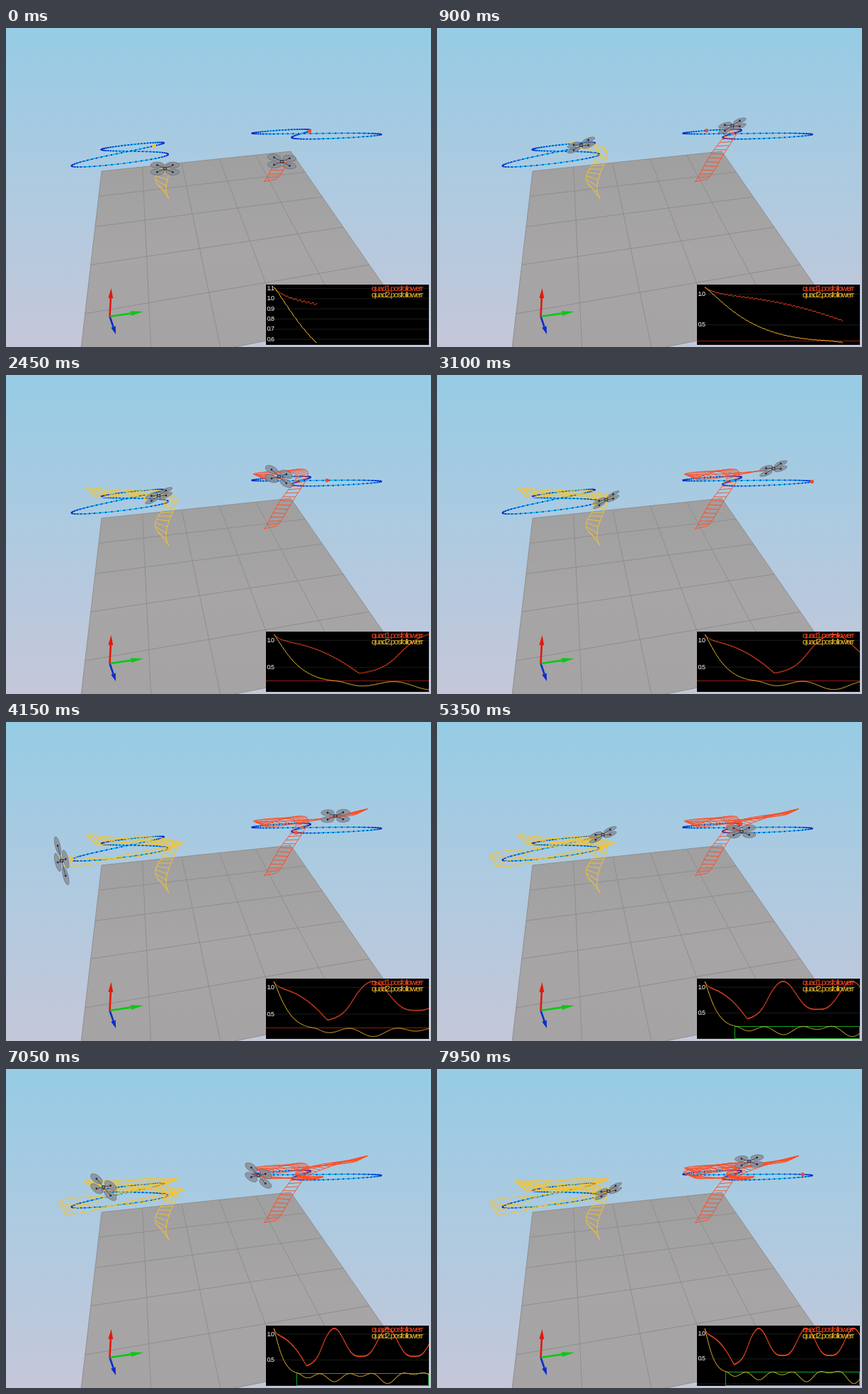
Animation of 600 by 450 pixels, one loop 8 s. Source, as an HTML page with a canvas:

```html
<!DOCTYPE html>
<html lang="en">
<head>
<meta charset="utf-8">
<title>Quadcopter path following</title>
<style>
  html, body { margin: 0; width: 100%; height: 100%; overflow: hidden; background: #b0cadf; }
  canvas { display: block; width: 600px; height: 450px; }
</style>
</head>
<body>
<canvas id="stage" width="600" height="450"></canvas>
<script>
const ctx = document.getElementById('stage').getContext('2d');
const { sin, cos, exp, min, max, abs, PI } = Math;
const LOOP = 8000, STEP = 50, LEAD = 410, LAP = 5120, TURN = 2 * PI;
const RED = '#ff4a22', YELLOW = '#f8c32c';

// Maps the unit square onto a quadrilateral, corners in order (0,0) (1,0) (1,1) (0,1).
function projector([x0, y0], [x1, y1], [x2, y2], [x3, y3]) {
  const ax = x1 - x2, bx = x3 - x2, sx = x0 - x1 + x2 - x3;
  const ay = y1 - y2, by = y3 - y2, sy = y0 - y1 + y2 - y3;
  const det = ax * by - bx * ay;
  const g = (sx * by - bx * sy) / det, h = (ax * sy - sx * ay) / det;
  return (u, v) => {
    const w = g * u + h * v + 1;
    return [((x1 - x0 + g * x1) * u + (x3 - x0 + h * x3) * v + x0) / w,
            ((y1 - y0 + g * y1) * u + (y3 - y0 + h * y3) * v + y0) / w];
  };
}

function smoothstep(a, b, x) {
  const s = min(1, max(0, (x - a) / (b - a)));
  return s * s * (3 - 2 * s);
}

function trace(points) {
  ctx.beginPath();
  points.forEach(([x, y]) => ctx.lineTo(x, y));
}
function line(points, color, width = 1) {
  trace(points);
  ctx.strokeStyle = color;
  ctx.lineWidth = width;
  ctx.stroke();
}
function fillShape(points, color) {
  trace(points);
  ctx.fillStyle = color;
  ctx.fill();
}
function dot(x, y, size, color) {
  ctx.fillStyle = color;
  ctx.fillRect(x - size / 2, y - size / 2, size, size);
}
function vertical(y0, y1, ...colors) {
  const g = ctx.createLinearGradient(0, y0, 0, y1);
  colors.forEach((c, i) => g.addColorStop(i / (colors.length - 1), c));
  return g;
}

// Figure eight in perspective, given its four turning points.
function eight(...corners) {
  const map = projector(...corners);
  return a => map((1 + sin(2 * a)) / 2, (1 - cos(a) / Math.SQRT1_2) / 2);
}
const phase = t => 1.2 - TURN * t / LAP;

// The lagging quad cuts the figure eight down to a slanted loop.
function slantedLoop(t) {
  const a = TURN * (t - 3500) / LAP;
  return [430 + 37 * cos(a) + 28 * sin(a) + 38 * cos(2 * a) - 9 * sin(2 * a),
          142.5 - 16 * cos(a) + 2 * sin(a) - 5 * cos(2 * a)];
}

// Share of the way from the start position to the settled flight.
const arrive = (e, time, swing = Infinity) => 1 - exp(-e / time) * cos(TURN * e / swing);

const wideEight = eight([116, 163], [235, 158], [243, 173], [79, 195]);
const quads = [
  {
    color: YELLOW,
    route: eight([135, 171], [223, 162], [229, 178], [94, 193]),
    start: [225, 234],
    settled: t => wideEight(phase(t)),
    progress: e => [arrive(e, 600), arrive(e, 600)]
  },
  {
    color: RED,
    route: eight([349, 149], [425, 143], [523, 149], [408, 156]),
    start: [373, 215],
    settled: slantedLoop,
    progress: e => [arrive(e, 1000), arrive(e, 1400, 3600)]
  }
];

function place(quad, t) {
  const goal = quad.settled(t), share = quad.progress(t + LEAD);
  return quad.start.map((s, i) => s + (goal[i] - s) * share[i]);
}

// Position and the two diagonal arms; the frame banks with sideways acceleration.
function pose(quad, t) {
  const h = 60, [x, y] = place(quad, t);
  const pull = (place(quad, t + h)[0] - 2 * x + place(quad, t - h)[0]) / (h * TURN / LAP) ** 2;
  const bank = 0.0025 * pull, arm = 11 / Math.hypot(1, bank);
  const depth = max(1.5, 5 + 4 * bank);
  return { x, y, p: [arm, arm * bank + depth], q: [arm, arm * bank - depth] };
}

function drawWorld() {
  ctx.fillStyle = vertical(0, 450, '#96cce5', '#aecae0', '#c5c7d9');
  ctx.fillRect(0, 0, 600, 450);
  const floor = projector([135, 202], [402, 174], [560, 402], [101, 495]);
  fillShape([floor(0, 0), floor(1, 0), floor(1, 1), floor(0, 1)],
    vertical(174, 450, '#a09fa0', '#a7a5a6', '#a5a3a4'));
  for (let i = 0; i <= 5; i++) {
    line([floor(i / 5, 0), floor(i / 5, 1)], '#8f8e8f');
    line([floor(0, i / 5), floor(1, i / 5)], '#8f8e8f');
  }
}

function drawArrow(x, y, head, color) {
  const ox = 146.5, oy = 407, n = Math.hypot(x - ox, y - oy);
  const ux = (x - ox) / n, uy = (y - oy) / n, bx = x - ux * head, by = y - uy * head;
  line([[ox, oy], [bx, by]], color, 2.6);
  fillShape([[x, y], [bx - uy * 3.4, by + ux * 3.4], [bx + uy * 3.4, by - ux * 3.4]], color);
}

function drawRoute(path) {
  const count = 110;
  for (let i = 0; i < count; i++) {
    const a = i / count * TURN, speed = Math.sqrt(abs(cos(2 * a)));
    const [x, y] = path(a);
    line([[x, y], path(a + TURN / count)], `rgb(0,${40 + 150 * speed},${215 + 25 * speed})`, 1.4);
    dot(x, y, 1.8, '#0828c8');
  }
}

function drawTrail(quad, now) {
  const left = [], right = [];
  for (let t = -LEAD; t <= now; t += 20) {
    const { x, y, p, q } = pose(quad, t);
    const wx = 0.4 * (p[0] + q[0]), wy = 0.4 * (p[1] + q[1]);
    left.push([x - wx, y - wy]);
    right.push([x + wx, y + wy]);
  }
  line(left, quad.color);
  line(right, quad.color);
  for (let i = 0; i < left.length; i += 4) line([left[i], right[i]], quad.color, 0.9);
}

function drawQuad(quad, t) {
  const { x, y, p, q } = pose(quad, t);
  const hubs = [1, -1].flatMap(s => [p, q].map(([dx, dy]) => [x + s * dx, y + s * dy]));
  hubs.forEach(hub => {
    ctx.save();
    ctx.transform(...p, ...q, ...hub);
    ctx.beginPath();
    ctx.arc(0, 0, 0.6, 0, TURN);
    ctx.restore();
    ctx.fillStyle = 'rgba(136,142,153,0.85)';
    ctx.fill();
    ctx.strokeStyle = 'rgba(80,85,96,0.8)';
    ctx.lineWidth = 0.6;
    ctx.stroke();
  });
  hubs.forEach(hub => {
    line([[x, y], hub], '#4a4d58');
    dot(...hub, 2.4, '#22242e');
  });
  dot(x, y, 5, '#3a3d4c');
  dot(x, y, 2, '#9aa0c0');
}

const cycle = e => 2 * TURN * (e - 2910) / LAP;
const ripple = e => sin(TURN * e / 40);

function redError(e) {
  const first = max(0.38, 0.98 - 0.24 * (e / 1000) ** 2 + 0.13 * exp(-e / 120));
  const steady = 0.57 + 0.54 * ((1 + cos(cycle(e))) / 2) ** 1.6;
  return first + (steady - first) * smoothstep(1450, 2500, e)
    + 0.011 * smoothstep(0, 250, e) * ripple(e);
}
function yellowError(e) {
  const c = cycle(e);
  const wave = -0.024 - 0.054 * cos(2 * c) - e / 70000 * cos(c);
  return 0.2 + 0.91 * exp(-((e / 440) ** 1.2)) + wave * smoothstep(900, 1500, e) + 0.004 * ripple(e);
}

function drawChart(now) {
  const end = now + LEAD, span = max(end, 1472), top = 1.11, limit = 0.25;
  const samples = [];
  for (let e = 0; e <= end; e += 10) samples.push([e, redError(e), yellowError(e)]);
  const low = min(...samples.map(s => s[2])), range = top - low;
  const px = e => 378 + 219 * e / span, py = v => 444 - 78 * (v - low) / range;

  ctx.save();
  ctx.beginPath();
  ctx.rect(367, 362, 230, 85);
  ctx.clip();
  ctx.fillStyle = '#000';
  ctx.fillRect(367, 362, 230, 85);

  const tick = range < 0.6 ? 0.1 : range < 0.8 ? 0.2 : 0.5;
  ctx.font = '9px "Liberation Sans", Arial, sans-serif';
  ctx.textBaseline = 'middle';
  ctx.letterSpacing = '-1px';
  for (let v = 0; v < 1.15; v += tick) {
    const y = py(v);
    line([[367, y], [597, y]], '#1c1c1c');
    if (v > 0.05 && y < 440) {
      ctx.fillStyle = '#fff';
      ctx.fillText(v.toFixed(1), 368.5, y);
    }
  }

  const limitY = Math.round(py(limit)) + 0.5;
  if (now < 4700) {
    line([[367, limitY], [597, limitY]], '#8e1c12');
  } else {
    ctx.strokeStyle = '#12a51c';
    ctx.lineWidth = 1;
    ctx.strokeRect(Math.round(px(1100)) + 0.5, limitY, 596 - Math.round(px(1100)), 446.5 - limitY);
  }
  [RED, YELLOW].forEach((color, i) =>
    line(samples.map(s => [px(s[0]), py(s[i + 1])]), color));

  ctx.font = '11.5px "Liberation Sans", Arial, sans-serif';
  ctx.letterSpacing = '-1.4px';
  [RED, YELLOW].forEach((color, i) => {
    ctx.fillStyle = color;
    ctx.fillText(`quad${i + 1}.posfollowerr`, 516, 368 + 9 * i);
  });
  ctx.restore();
}

function draw(t) {
  ctx.lineJoin = 'round';
  drawWorld();
  drawArrow(155, 432, 11, '#0a2cc8');
  drawArrow(194, 400, 18, '#0cc814');
  drawArrow(148.5, 367, 14, '#e2180c');
  quads.forEach(q => drawRoute(q.route));
  quads.forEach(q => drawTrail(q, t));
  quads.forEach(q => {
    const [x, y] = q.route(phase(t));
    ctx.beginPath();
    ctx.arc(x, y, 2.6, 0, TURN);
    ctx.fillStyle = q.color;
    ctx.fill();
    drawQuad(q, t);
  });
  drawChart(t);
}

const start = performance.now();
function frame() {
  const t = (performance.now() - start) % LOOP;
  draw(Math.floor(t / STEP) * STEP);
  requestAnimationFrame(frame);
}
frame();
</script>
</body>
</html>
```
